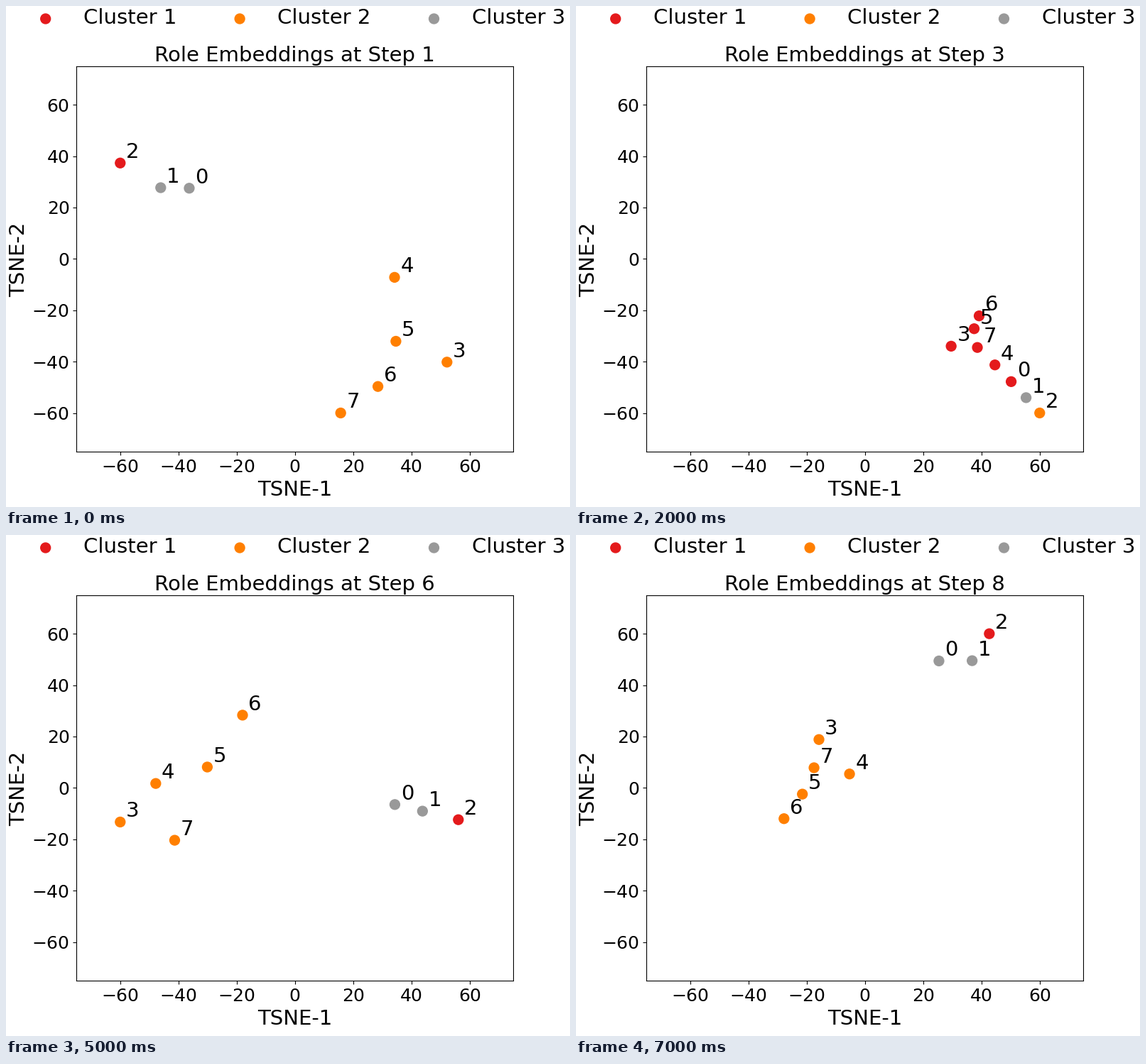
Animation of 794 by 706 pixels, one loop 8000 ms. Source, as a matplotlib script:

```python
import numpy as np
import matplotlib.pyplot as plt
from matplotlib.animation import FuncAnimation

W, H, DPI = 794, 706, 100
RED, ORANGE, GRAY = "#e41a1c", "#ff7f00", "#999999"
TICK_SIZE, TEXT_SIZE = 18, 21
ROLES = range(8)

plt.rcParams["font.family"] = "DejaVu Sans"


def strand(count, keys):
    """Spread roles along the point, line or parabola through the key points."""
    u = np.linspace(0, 1, count)
    if len(keys) == 2:
        u **= 1.2  # roles crowd slightly towards the start of a line
    fit = np.polyfit(np.linspace(0, 1, len(keys)), keys, len(keys) - 1)
    return np.polyval(fit, u)


def layout(**strands):
    """Place the roles named by each keyword's digits, as x + iy."""
    spots = np.zeros(len(ROLES), complex)
    for name, keys in strands.items():
        roles = [int(c) for c in name[1:]]
        spots[roles] = strand(len(roles), keys)
    return spots


def squash(spots, k):
    return spots.real + 1j * k * spots.imag


spread = layout(r012=[-29.2 - 26.5j, -60 - 40.7j],
                r4756=[28.2 + 60j, 32.5 + 25.2j, 53.4 + 2.1j],
                r3=[21.9 + 3.7j])
risen = layout(r012=[25.4 + 49.4j, 36.8 + 49.5j, 42.7 + 60j],
               r3756=[-15.8 + 18.8j, -19.2 + 2.6j, -27.8 - 12j],
               r4=[-5.3 + 5.4j])
STEPS = [
    layout(r012=[-36.3 + 27.5j, -46.1 + 27.7j, -60 + 37.3j],
           r4567=[34.2 - 7.2j, 32.4 - 41.8j, 15.7 - 60j],
           r3=[52.2 - 40.2j]),
    layout(r012=[-44.7 - 41.9j, -60 - 60j],
           r456=[-7.3 + 7j, 11 + 14.5j, 26.5 + 18.8j],
           r3=[-10 + 25.7j], r7=[26.3 + 3.1j]),
    layout(r74012=[38.6 - 34.5j, 50.2 - 47.8j, 60 - 60j],
           r356=[29.6 - 34j, 37.5 - 27.2j, 39.2 - 22.2j]),
    spread,
    squash(spread, 0.8),
    layout(r012=[34.3 - 6.5j, 56.1 - 12.4j],
           r456=[-47.8 + 1.7j, -30.1 + 8.1j, -18 + 28.3j],
           r3=[-60 - 13.3j], r7=[-41.3 - 20.4j]),
    squash(risen, -1),
    risen,
]

SPLIT = [GRAY, GRAY, RED] + [ORANGE] * 5
MERGED = [RED, GRAY, ORANGE] + [RED] * 5
MERGED_STEP = 2

fig = plt.figure(figsize=(W / DPI, H / DPI), dpi=DPI, facecolor="white")

# Plot area
left, right, bottom, top = 99.3, 714.3, 78.2, 621.2
ax = fig.add_axes([left / W, bottom / H, (right - left) / W, (top - bottom) / H])
ax.set(xlim=(-75, 75), ylim=(-75, 75),
       xticks=range(-60, 61, 20), yticks=range(-60, 61, 20))
ax.tick_params(labelsize=TICK_SIZE)
title = ax.set_title("", fontsize=TEXT_SIZE, pad=5)

# Page layer in pixels, y pointing down
page = fig.add_axes([0, 0, 1, 1])
page.set(xlim=(0, W), ylim=(H, 0))
page.axis("off")


def label(x, y, text, **style):
    page.text(x, y, text, fontsize=TEXT_SIZE, va="baseline", **style)


label(407, 689.5, "TSNE-1", ha="center")
label(26.6, 357, "TSNE-2", ha="center", rotation=90, rotation_mode="anchor")
for i in range(3):
    label(109 + 273.5 * i, 25.4, f"Cluster {i + 1}", ha="left")

key_x = 55.7 + 273.4 * np.arange(3)
key = page.scatter(key_x, [18] * 3, s=100, c=[RED, ORANGE, GRAY])

dots = ax.scatter(STEPS[0].real, STEPS[0].imag, s=100, c=SPLIT)
tags = [ax.text(0, 0, str(i), fontsize=TEXT_SIZE) for i in ROLES]


def update(step):
    spots = STEPS[step]
    title.set_text(f"Role Embeddings at Step {step + 1}")
    dots.set_offsets(np.column_stack([spots.real, spots.imag]))
    dots.set_color(MERGED if step == MERGED_STEP else SPLIT)
    for tag, spot in zip(tags, spots):
        tag.set_position((spot.real + 2, spot.imag + 2))
    return [title, dots, *tags]


anim = FuncAnimation(fig, update, frames=len(STEPS), interval=1000,
                     repeat=True, repeat_delay=0, blit=False)
plt.show()
```
